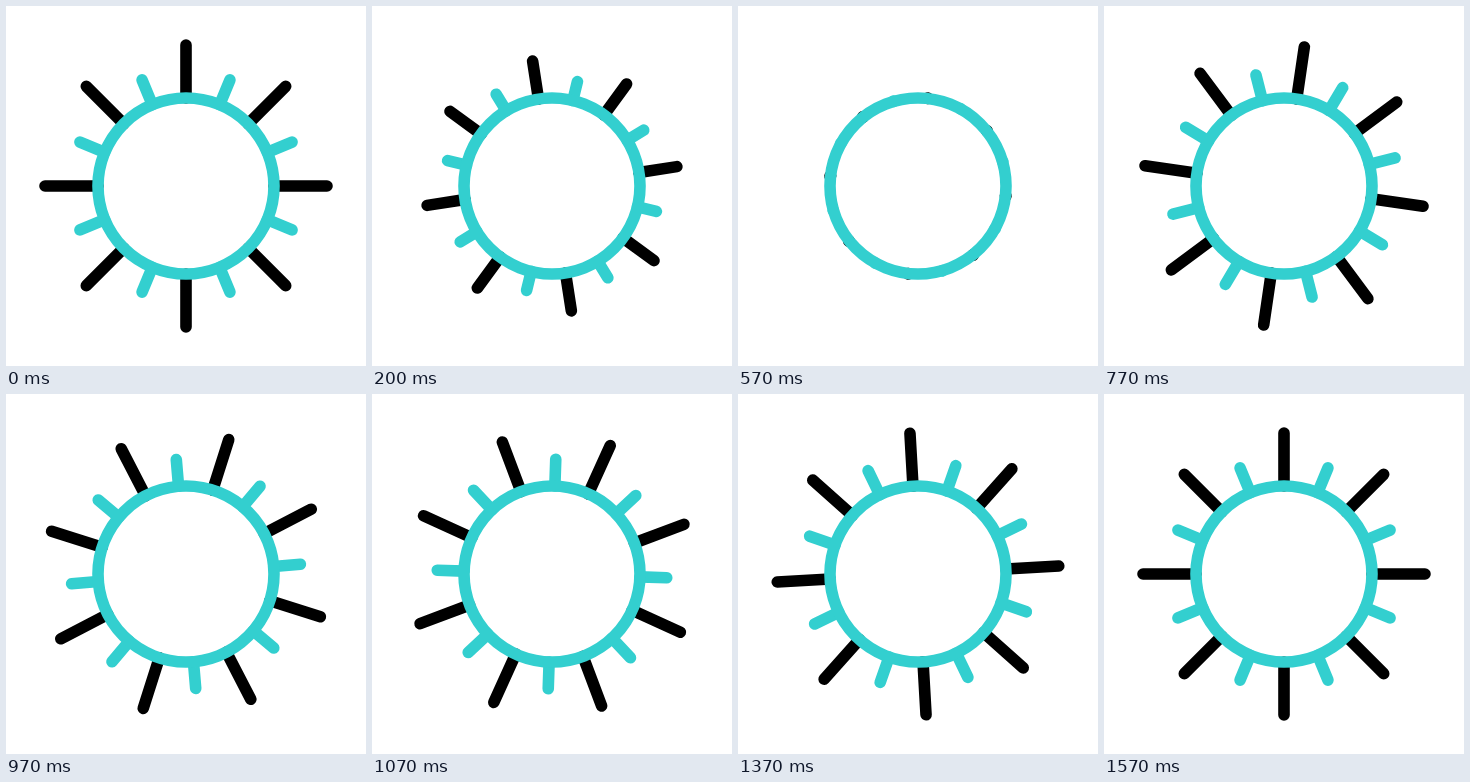
An HTML page that plays this animation: 360 px wide and 360 px high, repeating every 1.67 s.

```html
<!DOCTYPE html>
<html lang="en">
<head>
<meta charset="utf-8">
<title>Sun</title>
<style>
  html, body { margin: 0; width: 100%; height: 100%; overflow: hidden; background: #fff; }
  svg { display: block; width: 100vw; height: 100vh; }
</style>
</head>
<body>
<svg viewBox="0 0 360 360" fill="none" stroke-width="11.6" stroke-linecap="round">
  <g id="rays">
    <path id="long" stroke="#000"/>
    <path id="short" stroke="#33cfcf"/>
  </g>
  <circle cx="180" cy="180" r="88" stroke="#33cfcf"/>
</svg>
<script>
const LOOP = 1670, STEP = 100 / 3, LAST = 47;
const RING = 88, LONG = 141, SHORT = 114.8;
const SWING = -38.9, TURN = 18.2, REST = 46.8;
const HIDDEN = 16.5, GROWN = 23.5;

const rays = document.getElementById('rays');
const longRays = document.getElementById('long');
const shortRays = document.getElementById('short');

const clamp = x => Math.min(1, Math.max(0, x));

// cubic-bezier(.42, 0, .58, 1), solved by bisection
function ease(x) {
  x = clamp(x);
  let lo = 0, hi = 1;
  for (let i = 0; i < 30; i++) {
    const s = (lo + hi) / 2, r = 1 - s;
    if (3 * r * r * s * 0.42 + 3 * r * s * s * 0.58 + s * s * s < x) lo = s;
    else hi = s;
  }
  return lo * lo * (3 - 2 * lo);
}

// rises from 0 to 1 at peak, then falls back to 0 at end
const swell = (f, peak, end) =>
  f < peak ? ease(f / peak) : 1 - ease((f - peak) / (end - peak));

function spokes(offset, tip) {
  let d = '';
  for (let i = 0; i < 8; i++) {
    const a = (offset + i * 45) * Math.PI / 180;
    const at = r => `${(180 + r * Math.sin(a)).toFixed(3)} ${(180 - r * Math.cos(a)).toFixed(3)}`;
    d += `M${at(RING)}L${at(tip)}`;
  }
  return d;
}

function draw(ms) {
  const f = Math.min(LAST, Math.floor((ms % LOOP + 3.5) / STEP));
  const size = 1 - swell(f, HIDDEN, GROWN);
  longRays.setAttribute('d', spokes(0, RING + (LONG - RING) * size));
  shortRays.setAttribute('d', spokes(22.5, RING + (SHORT - RING) * size));
  rays.setAttribute('transform', `rotate(${SWING * swell(f, TURN, REST)} 180 180)`);
}

const start = performance.now();
function tick() {
  draw(performance.now() - start);
  requestAnimationFrame(tick);
}
tick();
</script>
</body>
</html>
```
